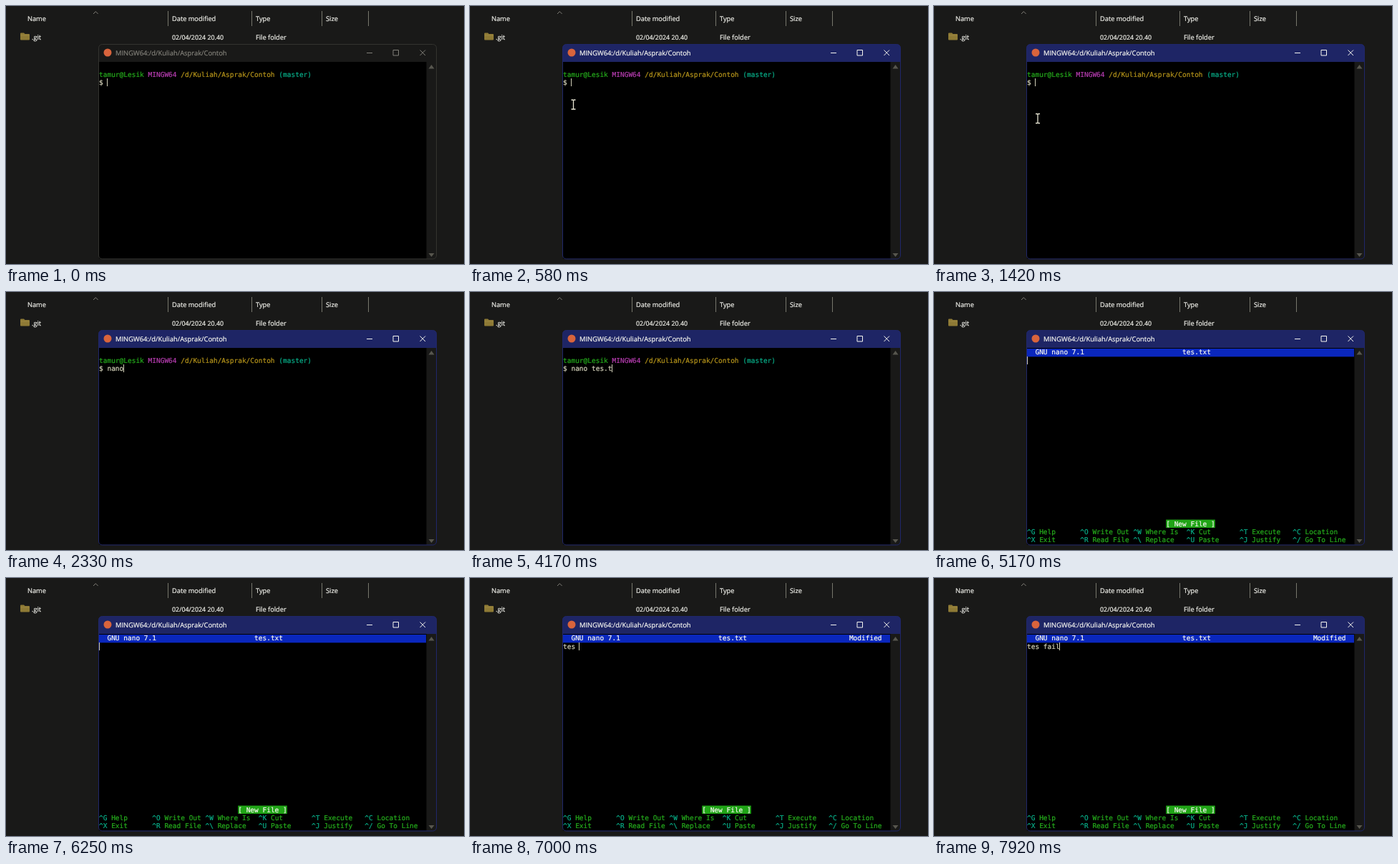
An HTML page for the animation above (8 s loop, 640 px wide and 360 px high).

```html
<!DOCTYPE html>
<html lang="en">
<head>
<meta charset="utf-8">
<title>Terminal session</title>
<style>
  html, body { margin: 0; width: 100%; height: 100%; overflow: hidden; background: #191918; }
  svg { display: block; width: 100vw; height: 100vh; }
  text { white-space: pre; text-rendering: geometricPrecision; stroke: currentColor; stroke-width: .22px; fill: currentColor; }
  .ui { font-family: "Open Sans", "Noto Sans", sans-serif; font-size: 9.25px; }
  .mono { font-family: "DejaVu Sans Mono", monospace; font-size: 9.49px; }
</style>
</head>
<body>
<svg id="stage" viewBox="0 0 640 360"></svg>
<script>
const LOOP = 8000, COL = 5.7125, ROW = 11.4, LEFT = 130, TOP = 78.2, BLINK = 500;
const FOCUS = 420, ENTER = 4750, OPEN = 5170;
const C = {
  desk: '#191918', line: '#76766c', dim: '#807f78', text: '#d2d0b8', label: '#eeeee8',
  green: '#25ac1c', pink: '#b43cae', yellow: '#b3921a', teal: '#08ab86',
  bar: '#1e2565', edge: '#20276a', blue: '#0a27bd', white: '#f6f6f0'
};

const shellKeys = [
  [1830, 'n'], [2000, 'a'], [2170, 'n'], [2330, 'o'], [2580, ' '], [2920, 't'], [3080, 'e'],
  [3250, 's'], [3750, '.'], [4080, 't'], [4250, 'x'], [4420, 't']
];
const editorKeys = [
  [6330, 't'], [6670, 'e'], [6830, 's'], [7000, ' '],
  [7420, 'f'], [7580, 'a'], [7750, 'i'], [7920, 'l']
];
const blinkResets = [FOCUS, ...shellKeys.map(k => k[0]), ENTER, OPEN, ...editorKeys.map(k => k[0])];
const pointerPath = [[250, 144.5, 137.5], [670, 144.5, 137.5], [920, 145, 157]];

const stage = document.getElementById('stage');

function add(parent, tag, attrs, content = '') {
  const node = document.createElementNS('http://www.w3.org/2000/svg', tag);
  for (const key in attrs) node.setAttribute(key, attrs[key]);
  node.textContent = content;
  parent.append(node);
  return node;
}
const rect = (p, x, y, width, height, fill, extra = {}) =>
  add(p, 'rect', { x, y, width, height, fill, ...extra });
const stroke = (p, d, color, width = 1) =>
  add(p, 'path', { d, fill: 'none', stroke: color, 'stroke-width': width });
const label = (x, y, content, size = 9.25) =>
  add(stage, 'text', { class: 'ui', x, y, color: C.label, style: `font-size:${size}px` }, content);
const cell = (p, col, row, content, color) =>
  add(p, 'text', { class: 'mono', x: LEFT + col * COL, y: TOP + row * ROW + 8.9, color }, content);
const show = (node, on) => node.setAttribute('visibility', on ? 'visible' : 'hidden');

// File list
rect(stage, 0, 0, 640, 360, C.desk);
[[30, 'Name'], [232, 'Date modified'], [349, 'Type'], [447, 'Size']]
  .forEach(([x, name]) => label(x, 20.8, name));
[226.5, 343.5, 441.5, 506.5].forEach(x => stroke(stage, `M${x} 7V28`, C.line));
stroke(stage, 'M122 11L125.3 7.7L128.6 11', C.dim);
add(stage, 'path', {
  d: 'M20 38.5q0-1 1-1h4l1.5 1.5h5.5q1 0 1 1v6.5q0 1-1 1h-11q-1 0-1-1z', fill: '#8e7a35'
});
stroke(stage, 'M20.5 41H32.5', '#a18c45', .8);
label(36, 46.6, '.git');
label(232, 46.6, '02/04/2024 20.40', 8.9);
label(349, 46.6, 'File folder');

// Terminal window
rect(stage, 129.5, 53.5, 472, 299.5, C.desk, { rx: 5 });
const titleBar = add(stage, 'path', {
  d: 'M129.5 78V58.5q0-5 5-5H596.5q5 0 5 5V78z', fill: C.desk
});
rect(stage, 130, 78, 457.5, 274.5, '#000');
const frame = rect(stage, 129.5, 53.5, 472, 299.5, 'none', { rx: 5, 'stroke-width': 1 });
add(stage, 'circle', { cx: 142, cy: 65, r: 5.5, fill: '#d9643c' });
const title = label(153, 68.7, 'MINGW64:/d/Kuliah/Asprak/Contoh', 9.4);
const buttons = stroke(stage, 'M504 65.5H512M541 61.5H548.5V69H541zM578.5 61.5L586 69M586 61.5L578.5 69', C.dim);
add(stage, 'path', { d: 'M590.5 87.5L594.5 82L598.5 87.5zM590.5 345L594.5 350L598.5 345z', fill: '#57564e' });

// Shell screen
const shell = add(stage, 'g', {});
cell(shell, 0, 1, 'tamur@Lesik', C.green);
cell(shell, 12, 1, 'MINGW64', C.pink);
cell(shell, 20, 1, '/d/Kuliah/Asprak/Contoh', C.yellow);
cell(shell, 44, 1, '(master)', C.teal);
cell(shell, 0, 2, '$', C.text);
const command = cell(shell, 2, 2, '', C.text);

// Editor screen
const editor = add(stage, 'g', {});
rect(editor, LEFT, 79, 80 * COL, 11.3, C.blue);
cell(editor, 2, 0, 'GNU nano 7.1', C.white);
cell(editor, 38, 0, 'tes.txt', C.white);
const modified = cell(editor, 70, 0, 'Modified', C.white);
const buffer = cell(editor, 0, 1, '', C.text);
rect(editor, LEFT + 34 * COL, TOP + 21 * ROW, 12 * COL, ROW, '#20a416');
cell(editor, 34, 21, '[ New File ]', C.white);
[
  ['G Help', 'O Write Out', 'W Where Is', 'K Cut', 'T Execute', 'C Location'],
  ['X Exit', 'R Read File', '\\ Replace', 'U Paste', 'J Justify', '/ Go To Line']
].forEach((row, r) => row.forEach((item, i) => {
  cell(editor, i * 13, 22 + r, '^' + item[0], C.teal);
  cell(editor, i * 13 + 3, 22 + r, item.slice(2), C.green);
}));

const caret = rect(stage, 0, 0, 1, 11, C.text);
const pointer = stroke(stage, 'M-3-6.5H-1Q0-6.5 0-5.5Q0-6.5 1-6.5H3M0-5.5V5.5M-3 6.5H-1Q0 6.5 0 5.5Q0 6.5 1 6.5H3', '#e6e4d2', 1.3);

const typed = (keys, t) => keys.filter(k => k[0] <= t).map(k => k[1]).join('');

function pointerAt(t) {
  const next = pointerPath.findIndex(p => p[0] > t);
  if (next < 1) return pointerPath.at(next).slice(1);
  const [a, b] = [pointerPath[next - 1], pointerPath[next]];
  const u = (t - a[0]) / (b[0] - a[0]), ease = u * u * (3 - 2 * u);
  return [1, 2].map(i => a[i] + (b[i] - a[i]) * ease);
}

function draw(t) {
  const active = t >= FOCUS, inEditor = t >= OPEN;
  titleBar.setAttribute('fill', active ? C.bar : C.desk);
  frame.setAttribute('stroke', active ? C.edge : '#33332f');
  title.setAttribute('color', active ? C.white : C.dim);
  buttons.setAttribute('stroke', active ? C.white : C.dim);

  const line = typed(shellKeys, t), body = typed(editorKeys, t);
  command.textContent = line;
  buffer.textContent = body;
  show(shell, !inEditor);
  show(editor, inEditor);
  show(modified, inEditor && body);

  const [col, row] = inEditor ? [body.length, 1] : t >= ENTER ? [0, 3] : [2 + line.length, 2];
  caret.setAttribute('x', Math.round(LEFT + col * COL - .4));
  caret.setAttribute('y', Math.round(TOP + row * ROW));
  const since = t - Math.max(0, ...blinkResets.filter(b => b <= t));
  show(caret, !active || Math.floor(since / BLINK) % 2 === 0);

  show(pointer, t >= pointerPath[0][0] && !line);
  pointer.setAttribute('transform', `translate(${pointerAt(t)})`);
}

const start = performance.now();
function tick(now) {
  draw(Math.max(0, now - start) % LOOP);
  requestAnimationFrame(tick);
}
draw(0);
requestAnimationFrame(tick);
</script>
</body>
</html>
```
